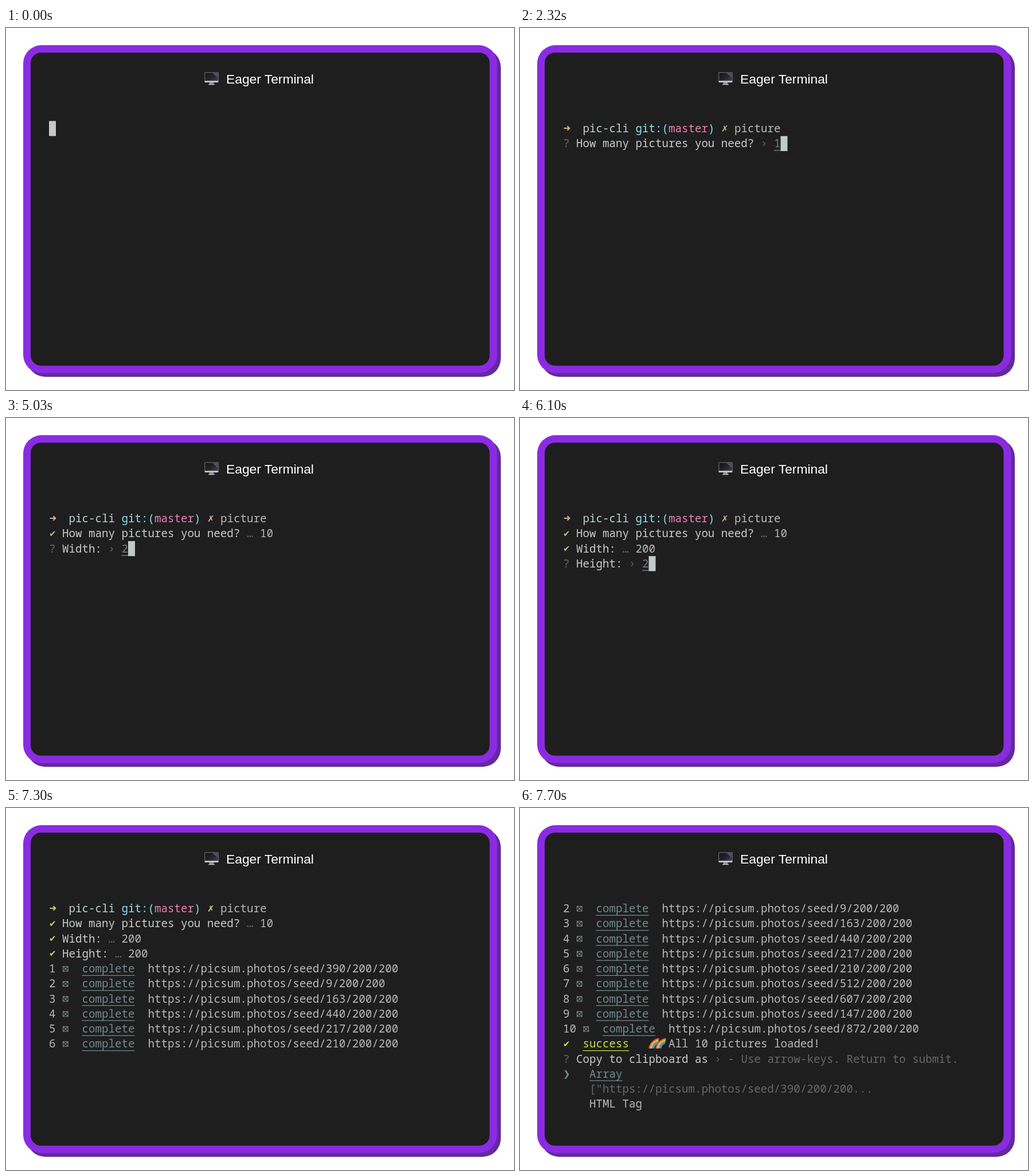
Animation of 886 by 632 pixels, one loop 8 s. Source, as an HTML page:

```html
<!DOCTYPE html>
<html lang="en">
<head>
<meta charset="utf-8">
<style>
html, body { margin: 0; width: 100%; height: 100%; overflow: hidden; background: #fff; }
svg { display: block; width: 100vw; height: 100vh; }
text { white-space: pre; }
.title { font: 22.8px "Liberation Sans", Arial, sans-serif; fill: #fff; }
.mono { font: 19.17px "Noto Sans Mono", "DejaVu Sans Mono", monospace; }
.sym { font: 15px "DejaVu Sans", "DejaVu Sans Mono", sans-serif; }
</style>
</head>
<body>
<svg viewBox="0 0 886 632">
  <defs>
    <linearGradient id="glass" x1="0" y1="0" x2="1" y2="1">
      <stop offset="0" stop-color="#151519"/><stop offset=".55" stop-color="#25222b"/>
      <stop offset="1" stop-color="#47434f"/>
    </linearGradient>
  </defs>
  <rect x="36.5" y="36.5" width="826.5" height="572.5" rx="32" fill="#622a9c"/>
  <rect x="30" y="30" width="826.5" height="572.5" rx="32" fill="#8a2be2"/>
  <rect x="43" y="43" width="800.5" height="546.5" rx="18" fill="#1e1e1e"/>
  <g>
    <path d="M355 95h7l1 4h-9z" fill="#8c8c94"/>
    <rect x="353" y="97.7" width="11" height="1.6" rx=".8" fill="#c2c2ca"/>
    <rect x="346.5" y="77.5" width="24" height="17.5" rx="1" fill="#c9c9d0"/>
    <rect x="346.5" y="77.5" width="24" height="14.7" rx="1" fill="#4b4652"/>
    <rect x="347.5" y="78.5" width="22" height="13.5" fill="url(#glass)"/>
    <path d="M360 78.5h9.5v9z" fill="#544d60"/>
  </g>
  <text class="title" x="384" y="97">Eager Terminal</text>
  <g id="screen"></g>
</svg>
<script>
const LOOP = 8000, X0 = 75, Y0 = 162.4, CELL_W = 11.5, CELL_H = 26.25;
const FG = '#b9b9b9', BRIGHT = '#c9cbcb', DIM = '#676767', TEAL = '#74898b';
const CYAN = '#8fe0ee', PINK = '#f27fb0', LIME = '#c5e24b';
const SEEDS = [390, 9, 163, 440, 217, 210, 512, 607, 147, 872];
const RAINBOW = ['#e8553f', '#f5a13a', '#f4e04d', '#62c264', '#4aa3e8', '#9a5fd0'];
const screen = document.getElementById('screen');

const colX = c => X0 + c * CELL_W;
const rowY = r => Y0 + r * CELL_H;

function text(c, r, s, fill = FG, line = false) {
  const x = colX(c), y = rowY(r);
  return `<text class="mono" x="${x}" y="${y + 19.6}" fill="${fill}">${s}</text>` +
    (line ? `<path d="M${x} ${y + 25}h${s.length * CELL_W}" stroke="${fill}" stroke-width="1.4"/>` : '');
}

const symbol = (c, r, s, fill) =>
  `<text class="sym" x="${colX(c)}" y="${rowY(r) + 18.3}" fill="${fill}">${s}</text>`;

const cursor = (c, r, fill = '#c0cacd') =>
  `<rect x="${colX(c)}" y="${rowY(r)}" width="12" height="26.2" fill="${fill}"/>`;

const arrow = fill =>
  `<path d="M76.5 175H86M82.5 171.3L86.3 175L82.5 178.7" fill="none" stroke="${fill}" stroke-width="2"/>`;

const box = (c, r) =>
  `<path transform="translate(${colX(c)} ${rowY(r)})" d="M1.5 9.2h8.6v8.6h-8.6zl8.6 8.6m0-8.6l-8.6 8.6"
    fill="none" stroke="${TEAL}" stroke-width="1.1"/>`;

function rainbow(c, r) {
  const arc = (x, i) => {
    const q = 14 - i * 1.7;
    return `<path d="M${x - q} 0A${q} ${q + 3} 0 0 1 ${x} ${-q - 3}" stroke="${RAINBOW[i]}"/>`;
  };
  const half = x => RAINBOW.map((_, i) => arc(x, i)).join('');
  return `<g transform="translate(${colX(c)} ${rowY(r) + 21}) skewX(-12)" fill="none" stroke-width="1.8">
    ${half(14.5)}${half(26.5)}</g>`;
}

function prompt(cmd, accent, cross = accent) {
  return arrow(accent) + text(3, 0, 'pic-cli', '#bed0d0') + text(11, 0, 'git:(', CYAN) +
    text(16, 0, 'master', PINK) + text(22, 0, ')', CYAN) +
    symbol(24, 0, '✗', cross) + text(26, 0, cmd);
}

function ask(r, label, value) {
  const c = label.length + 3;
  return text(0, r, '?', DIM) + text(2, r, label, BRIGHT) + text(c, r, '›', DIM) +
    text(c + 2, r, value, '#737b7c', true) + cursor(c + 2 + value.length, r);
}

function answered(r, label, value, accent) {
  const c = label.length + 3;
  return symbol(0, r, '✔', accent) + text(2, r, label, BRIGHT) +
    text(c, r, '…', DIM) + text(c + 2, r, value);
}

function item(r, n) {
  const c = String(n).length;
  return text(0, r, String(n)) + box(c + 1, r) + text(c + 4, r, 'complete', TEAL, true) +
    text(c + 14, r, `https://picsum.photos/seed/${SEEDS[n - 1]}/200/200`);
}

function menu() {
  let out = '';
  for (let n = 2; n <= 10; n++) out += item(n - 2, n);
  return out + symbol(0, 9, '✔', LIME) + text(3, 9, 'success', LIME, true) + rainbow(13, 9) +
    text(16, 9, 'All 10 pictures loaded!') +
    text(0, 10, '?', DIM) + text(2, 10, 'Copy to clipboard as', BRIGHT) + text(23, 10, '›', DIM) +
    text(25, 10, '- Use arrow-keys. Return to submit.', DIM) +
    symbol(0, 11, '❯', TEAL) + text(4, 11, 'Array', TEAL, true) +
    text(4, 12, '["https://picsum.photos/seed/390/200/200...', DIM) + text(4, 13, 'HTML Tag');
}

// Number of key times already reached
const reached = (t, keys) => keys.filter(k => t >= k).length;
const typed = (t, s, keys, initial) => s.slice(0, reached(t, keys)) || initial;

function render(t) {
  if (t < 20) return cursor(0, 0, '#c7c7c7');
  if (t >= 7700) return menu();

  const cmd = typed(t, 'picture', [740, 980, 1040, 1340, 1590, 1670, 1750], '');
  if (t < 2320) {
    const end = t < 2100 ? cursor(26 + cmd.length, 0) : cursor(0, 1);
    return prompt(cmd, '#d3b291') + end;
  }

  const many = 'How many pictures you need?';
  if (t < 3830)
    return prompt(cmd, '#cdbb84') + ask(1, many, typed(t, '10', [3190, 3270], '1'));

  const done = t >= 6800;
  const check = done ? '#c3d36d' : '#b8b985';
  const cross = !done ? '#dab194' : t < 7000 ? '#d9bd79' : '#c8d870';
  let out = prompt(cmd, done ? check : '#d9b093', cross) + answered(1, many, '10', check);
  if (t < 5510)
    return out + ask(2, 'Width:', typed(t, '200', [5030, 5130, 5230], '100'));

  out += answered(2, 'Width:', '200', check);
  if (!done)
    return out + ask(3, 'Height:', typed(t, '200', [6100, 6200, 6300], '100'));

  out += answered(3, 'Height:', '200', check);
  const count = Math.floor((t - 6800) / 100) + 1;
  for (let n = 1; n <= count; n++) out += item(n + 3, n);
  return out;
}

let shown = '';
function tick() {
  const next = render(performance.now() % LOOP);
  if (next !== shown) screen.innerHTML = shown = next;
  requestAnimationFrame(tick);
}
tick();
</script>
</body>
</html>
```
